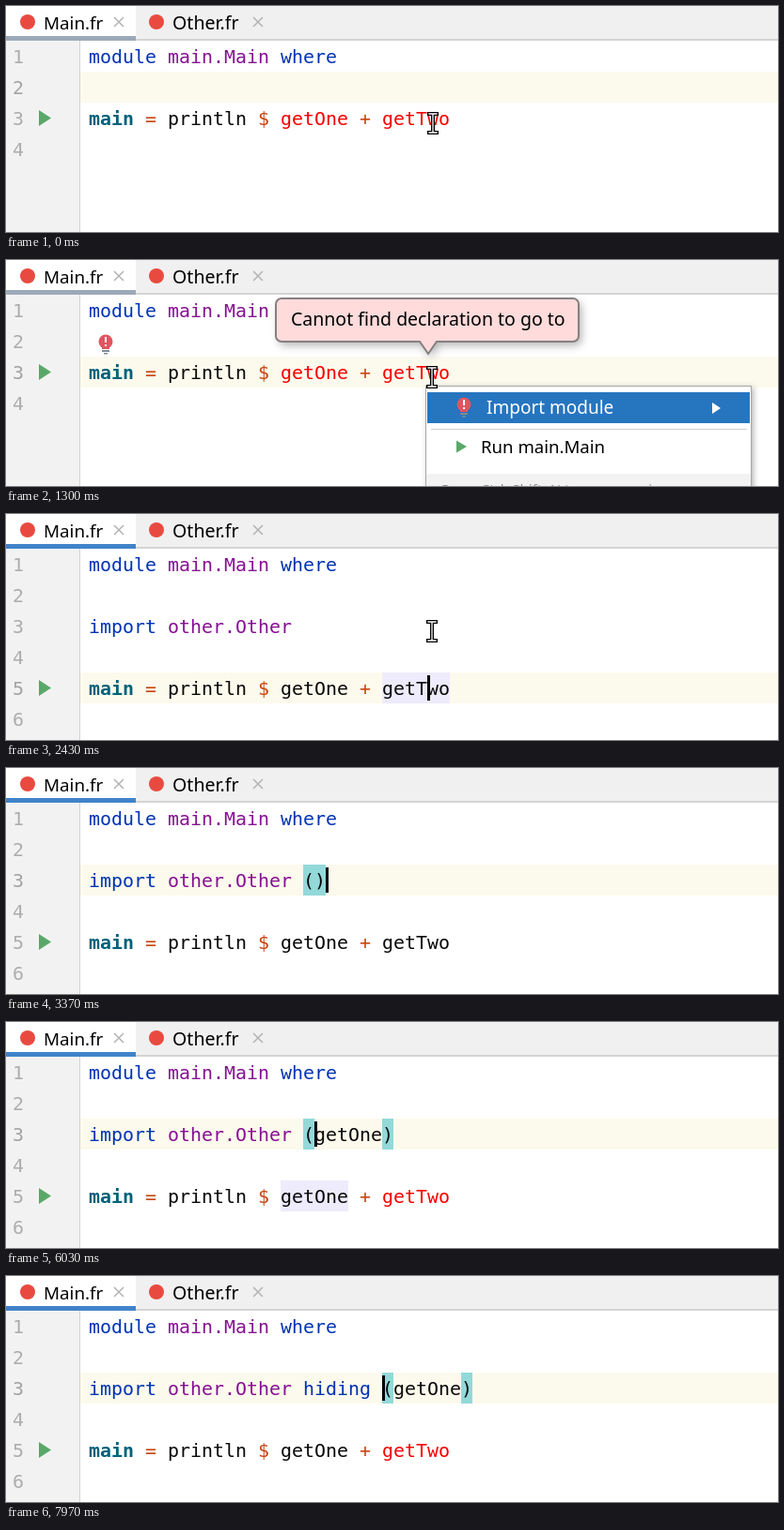
These frames come from a looping animation (821 by 241 pixels, 8000 ms). An HTML page with a canvas:

```html
<!DOCTYPE html>
<html lang="en">
<head>
<meta charset="utf-8">
<title>Import editing</title>
<style>
  html, body { margin: 0; width: 100%; height: 100%; overflow: hidden; background: #fff; }
  canvas { display: block; }
</style>
</head>
<body>
<canvas id="stage" width="821" height="241"></canvas>
<script>
const ctx = document.getElementById('stage').getContext('2d');
const LOOP = 8000, LEFT = 88, CELL = 12, ROW = 33, TOP = 37;
const MONO = '19.93px "DejaVu Sans Mono", monospace';
const ui = size => `${size}px "Noto Sans", sans-serif`;
const C = {
  keyword: '#0033b3', name: '#871094', func: '#00627a', op: '#c8460f', error: '#f50000', plain: '#080808',
  gutter: '#f2f2f2', caretRow: '#fcfaed', brace: '#93d9d9', usage: '#edebfc', green: '#59a869', focus: '#4083c9'
};
const GET_TIMES = [4600, 4730, 4870, 5130, 5230, 5330];
const HIDING_TIMES = [6770, 6900, 7000, 7070, 7130, 7470, 7670];

const colX = col => LEFT + col * CELL;
const rowY = row => TOP + (row - 1) * ROW;
const typed = (text, times, t) => text.slice(0, times.filter(at => t >= at).length);
const within = (t, from, to) => t >= from && t < to;

function box(x, y, w, h, color) {
  ctx.fillStyle = color;
  ctx.fillRect(x, y, w, h);
}

function text(str, x, y, font, color) {
  ctx.font = font;
  ctx.fillStyle = color;
  ctx.fillText(str, x, y);
}

function polygon(points, color) {
  ctx.beginPath();
  points.forEach(([x, y]) => ctx.lineTo(x, y));
  ctx.closePath();
  ctx.fillStyle = color;
  ctx.fill();
}

function line(points, color, width) {
  ctx.beginPath();
  points.forEach(([x, y], i) => i % 2 ? ctx.lineTo(x, y) : ctx.moveTo(x, y));
  ctx.strokeStyle = color;
  ctx.lineWidth = width;
  ctx.stroke();
}

function dot(x, y, r, color) {
  ctx.beginPath();
  ctx.arc(x, y, r, 0, Math.PI * 2);
  ctx.fillStyle = color;
  ctx.fill();
}

function shadow(color, blur, dx, dy) {
  ctx.shadowColor = color;
  ctx.shadowBlur = blur;
  ctx.shadowOffsetX = dx;
  ctx.shadowOffsetY = dy;
}

// Segments are [text, color, bold?], laid out on the character grid.
function code(row, segments) {
  let col = 0;
  for (const [str, color, bold] of segments) {
    text(str, colX(col), rowY(row) + 24, (bold ? 'bold ' : '') + MONO, color);
    col += str.length;
  }
}

const cells = (row, col, count, color) => box(colX(col), rowY(row), count * CELL, ROW, color);
const play = (x, y, w, h) => polygon([[x, y - h / 2], [x + w, y], [x, y + h / 2]], C.green);

function tab(x, label, size) {
  dot(x + 9, 17, 8, '#e84a40');
  text(label, x + 26, 25, ui(size), '#000');
}

function closeMark(x) {
  line([[x - 5, 12], [x + 5, 22], [x + 5, 12], [x - 5, 22]], '#b3b3b3', 1.5);
}

function tabs(focused) {
  box(0, 0, 821, 36, '#f0f0f0');
  box(0, 35, 821, 2, '#d4d4d4');
  box(0, 0, 138, 32, '#fff');
  box(0, 32, 138, 5, focused ? C.focus : '#9ca9b8');
  tab(14, 'Main.fr', 18.8);
  tab(151, 'Other.fr', 19.6);
  closeMark(120);
  closeMark(268);
}

function bulb(x, y) {
  dot(x, y - 2, 7.5, '#e05560');
  box(x - 4, y + 4, 8, 2, '#e05560');
  box(x - 4, y + 7, 8, 2, '#7f8b91');
  box(x - 2, y + 10, 4, 1.5, '#7f8b91');
  box(x - 1, y - 7, 2, 6, '#fff');
  box(x - 1, y + 1, 2, 2, '#fff');
}

function tooltip() {
  const l = 287, t = 41, r = 609, b = 87, rad = 6;
  ctx.beginPath();
  ctx.moveTo(l + rad, t);
  ctx.arcTo(r, t, r, b, rad);
  ctx.arcTo(r, b, l, b, rad);
  ctx.lineTo(458, b);
  ctx.lineTo(449, 100);
  ctx.lineTo(440, b);
  ctx.arcTo(l, b, l, t, rad);
  ctx.arcTo(l, t, r, t, rad);
  ctx.closePath();
  ctx.save();
  shadow('rgba(0,0,0,.3)', 10, 3, 4);
  ctx.fillStyle = '#ffdbdb';
  ctx.fill();
  ctx.restore();
  ctx.strokeStyle = '#858080';
  ctx.lineWidth = 2;
  ctx.stroke();
  text('Cannot find declaration to go to', 303, 70, ui(19.5), '#000');
}

function menu() {
  ctx.save();
  shadow('rgba(0,0,0,.3)', 6, 2, 2);
  box(446, 134, 347, 120, '#a8a8a8');
  ctx.restore();
  box(447, 135, 345, 110, '#fff');
  box(448, 141, 343, 33, '#2675bf');
  bulb(487, 156);
  text('Import module', 511, 164, ui(19), '#fff');
  polygon([[751, 152], [760, 158], [751, 164]], '#fff');
  box(452, 180, 336, 1, '#cfcfcf');
  play(479, 199, 11, 13);
  text('Run main.Main', 505, 206, ui(18.6), '#000');
  box(447, 228, 345, 13, '#f2f2f2');
  text('Press Ctrl+Shift+N to open preview', 463, 250, ui(15), '#8c8c8c');
}

function pointer(x, y) {
  const shape = [[x - 4, y - 10], [x + 4, y - 10], [x, y - 10], [x, y + 10], [x - 4, y + 10], [x + 4, y + 10]];
  ctx.lineCap = 'square';
  line(shape, '#000', 4);
  line(shape, '#fff', 1.3);
  ctx.lineCap = 'butt';
}

function caretAt(t) {
  if (t < 500 || within(t, 970, 1700)) return null;
  if (t < 1900) return [3, 30];
  if (t < 1970) return [5, 30];
  if (t < 2430) return null;
  if (t < 2470) return [5, 30];
  if (t < 2570) return [4, 0];
  if (t < 2930) return [3, 18];
  if (t < 3230) return [3, 19];
  if (within(t, 3370, 4100)) return [3, 21];
  if (within(t, 5800, 5970)) return null;
  if (t < 5970) return [3, 20 + typed('getOne', GET_TIMES, t).length];
  if (t < 6100) return [3, 20];
  return [3, 19 + typed('hiding ', HIDING_TIMES, t).length];
}

function activeRow(t) {
  if (t < 500) return 2;
  if (t < 1900) return 3;
  if (t < 2470) return 5;
  return t < 2570 ? 4 : 3;
}

function draw(t) {
  const imported = t >= 1900, parens = t >= 3230;
  const lastRow = imported ? 6 : 4, mainRow = imported ? 5 : 3;
  const active = activeRow(t), caret = caretAt(t);
  const inner = typed('getOne', GET_TIMES, t);
  const hiding = typed('hiding ', HIDING_TIMES, t);

  box(0, 0, 821, 241, '#fff');
  box(0, TOP, 78, 204, C.gutter);
  box(79, rowY(active), 742, ROW, C.caretRow);
  box(78, TOP, 1, 204, '#d2d2d2');
  tabs(within(t, 500, 1300) || t >= 1700);
  for (let row = 1; row <= lastRow; row++)
    text(row, 7, rowY(row) + 24, MONO, row === active ? '#a4a3a3' : '#adadad');
  play(35, rowY(mainRow) + 16.5, 13, 17);

  if (within(t, 2130, 2530)) cells(5, 26, 6, C.usage);
  if (within(t, 2630, 2930)) cells(3, 13, 5, C.usage);
  if (within(t, 5470, 6200)) cells(5, 17, 6, C.usage);
  if (parens) {
    const open = 19 + hiding.length;
    cells(3, open, 1, C.brace);
    cells(3, open + 1 + inner.length, 1, C.brace);
  }

  code(1, [['module ', C.keyword], ['main.Main', C.name], [' where', C.keyword]]);
  if (imported) code(3, [
    ['import ', C.keyword], ['other.Other ', C.name],
    [hiding, t >= 7970 ? C.keyword : C.plain],
    [parens ? `(${inner})` : '', C.plain]
  ]);
  const resolved = within(t, 2030, 3700);
  code(mainRow, [
    ['main', C.func, true], [' = ', C.op], ['println ', C.plain], ['$ ', C.op],
    ['getOne', resolved || t >= 5470 ? C.plain : C.error], [' + ', C.op],
    ['getTwo', resolved ? C.plain : C.error]
  ]);

  if (caret) box(colX(caret[1]), rowY(caret[0]) + 3, 3, 27, '#000');
  if (within(t, 700, 1700)) bulb(106, 89);
  if (within(t, 600, 1770)) tooltip();
  if (within(t, 1270, 1700)) menu();
  if (t < 2930) pointer(t < 30 ? 454 : t < 70 ? 458 : 453, 125);
}

const start = performance.now();
function tick() {
  draw((performance.now() - start) % LOOP);
  requestAnimationFrame(tick);
}
tick();
</script>
</body>
</html>
```
